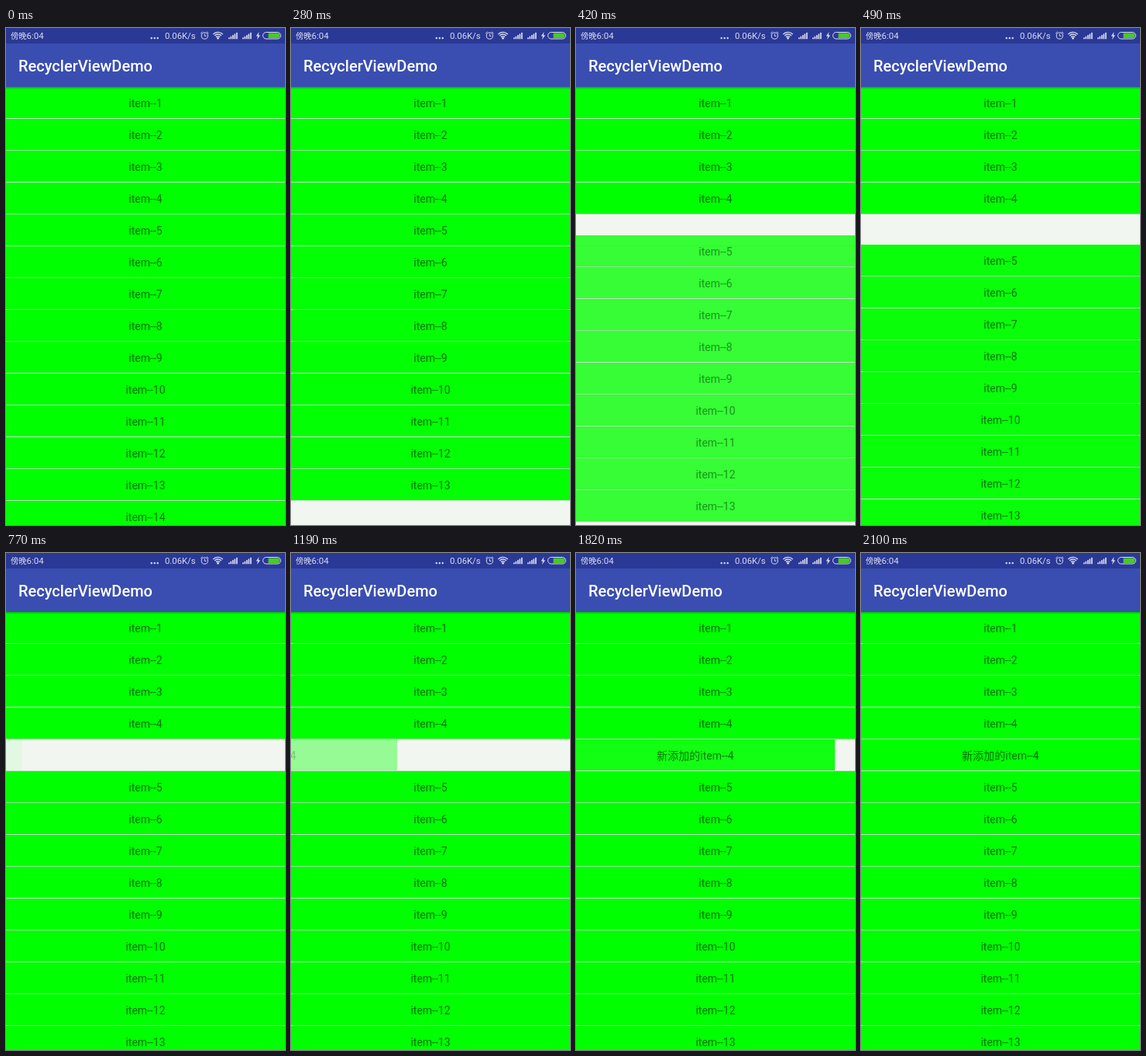
An HTML page with a canvas for the animation above (2.17 s loop, 360 by 640 pixels).

```html
<!DOCTYPE html>
<html>
<head>
<meta charset="utf-8">
<style>
html, body { margin: 0; width: 100%; height: 100%; overflow: hidden; }
canvas { display: block; }
</style>
</head>
<body>
<canvas id="stage" width="360" height="640"></canvas>
<script>
const c = document.getElementById('stage').getContext('2d');
const LOOP = 2170, STEP = 70, TOP = 76, PITCH = 41;
const MOVE = { start: 263, length: 260 };
const SLIDE = { start: 527, length: 1566 };
const FONT = 'Roboto, "Noto Sans CJK SC", "Noto Sans CJK", sans-serif';

// Accelerate-decelerate easing
function progress(t, { start, length }) {
  const x = Math.min(1, Math.max(0, (t - start) / length));
  return (1 - Math.cos(Math.PI * x)) / 2;
}

function rect(color, x, y, w, h) {
  c.fillStyle = color;
  c.fillRect(x, y, w, h);
}

function text(s, x, y, size, color, weight = 400, align = 'left') {
  c.font = `${weight} ${size}px ${FONT}`;
  c.textAlign = align;
  c.fillStyle = color;
  c.fillText(s, x, y);
}

function divider(slot, y) {
  rect(slot % 2 ? '#96df96' : '#c6dfc6', 0, y + 40, 360, 1);
}

function row(label, x, y, alpha = 1) {
  c.globalAlpha = alpha;
  rect('#00ff00', x, y, 360, 40);
  text(label, 180 + x, y + 26, 14, 'rgba(0,0,0,.56)', 400, 'center');
  c.globalAlpha = 1;
}

function list(t) {
  const move = progress(t, MOVE), slide = progress(t, SLIDE);
  const slotY = i => TOP + i * PITCH;
  if (move > 0) {
    divider(4, slotY(4));
    if (slide > 0) row('新添加的item--4', Math.round(360 * (slide - 1)), slotY(4), slide);
  }
  const count = move > 0 ? 13 : 14;
  for (let i = 0; i < count; i++) {
    const shifted = i > 3;
    const y = slotY(i) + (shifted ? Math.round(move * PITCH) : 0);
    const label = 'item--' + (i + 1);
    if (shifted && move > 0 && move < 1) {
      // The old and new rows cross-fade while moving together
      row(label, 0, y, 1 - move);
      row(label, 0, y, move);
    } else row(label, 0, y);
    divider(shifted && move > 0.5 ? i + 1 : i, y);
  }
}

function arc(x, y, r, from = 0, to = 2 * Math.PI) {
  c.beginPath();
  c.arc(x, y, r, from, to);
}

function line(...p) {
  c.beginPath();
  for (let i = 0; i < p.length; i += 2) c.lineTo(p[i], p[i + 1]);
  c.stroke();
}

function statusIcons() {
  const ink = '#d9dcef';
  c.fillStyle = c.strokeStyle = ink;
  for (let i = 0; i < 3; i++) { arc(187.7 + i * 4, 13, 1.2); c.fill(); }

  c.lineWidth = 1;
  arc(256.3, 10, 4.1); c.stroke();
  line(256.3, 7.5, 256.3, 10.3, 258.4, 10.3);
  line(251.2, 7, 253.6, 4.8);
  line(259, 4.8, 261.4, 7);

  c.lineWidth = 1.4;
  for (const r of [3.4, 6, 8.6]) {
    arc(273.5, 14, r, -Math.PI * .76, -Math.PI * .24);
    c.stroke();
  }
  arc(273.5, 13.2, 1.4); c.fill();

  for (const x of [287, 305])
    for (let i = 0; i < 5; i++) c.fillRect(x + i * 2.5, 12.3 - i * 1.6, 1.7, 1.9 + i * 1.6);

  c.beginPath();
  for (const [x, y] of [[326.5, 5], [322.7, 10.6], [325, 10.6], [324, 15], [328, 9.2], [325.7, 9.2]])
    c.lineTo(x, y);
  c.fill();

  c.lineWidth = 1;
  c.beginPath(); c.roundRect(331.5, 5.5, 23, 8.5, 4.2); c.stroke();
  c.fillStyle = '#49c926';
  c.beginPath(); c.roundRect(338.5, 6.5, 15, 6.5, [0, 3.2, 3.2, 0]); c.fill();
}

function header() {
  const shade = c.createLinearGradient(0, TOP, 0, TOP + 3);
  shade.addColorStop(0, 'rgba(0,0,0,.28)');
  shade.addColorStop(1, 'rgba(0,0,0,0)');
  rect(shade, 0, TOP, 360, 3);
  rect('#3a4eb1', 0, 0, 360, TOP);
  rect('#2a3996', 0, 0, 360, 20);
  text('RecyclerViewDemo', 16, 56, 20, '#fff', 500);
  text('傍晚', 6, 14, 10.3, '#d9dcef');
  text('6:04', 26.5, 14, 11.5, '#d9dcef');
  text('0.06K/s', 205, 14, 11.3, '#d9dcef');
  statusIcons();
}

function draw(now) {
  const t = Math.floor(now % LOOP / STEP) * STEP;
  rect('#f1f7f0', 0, 0, 360, 640);
  list(t);
  header();
  requestAnimationFrame(draw);
}
draw(0);
</script>
</body>
</html>
```
